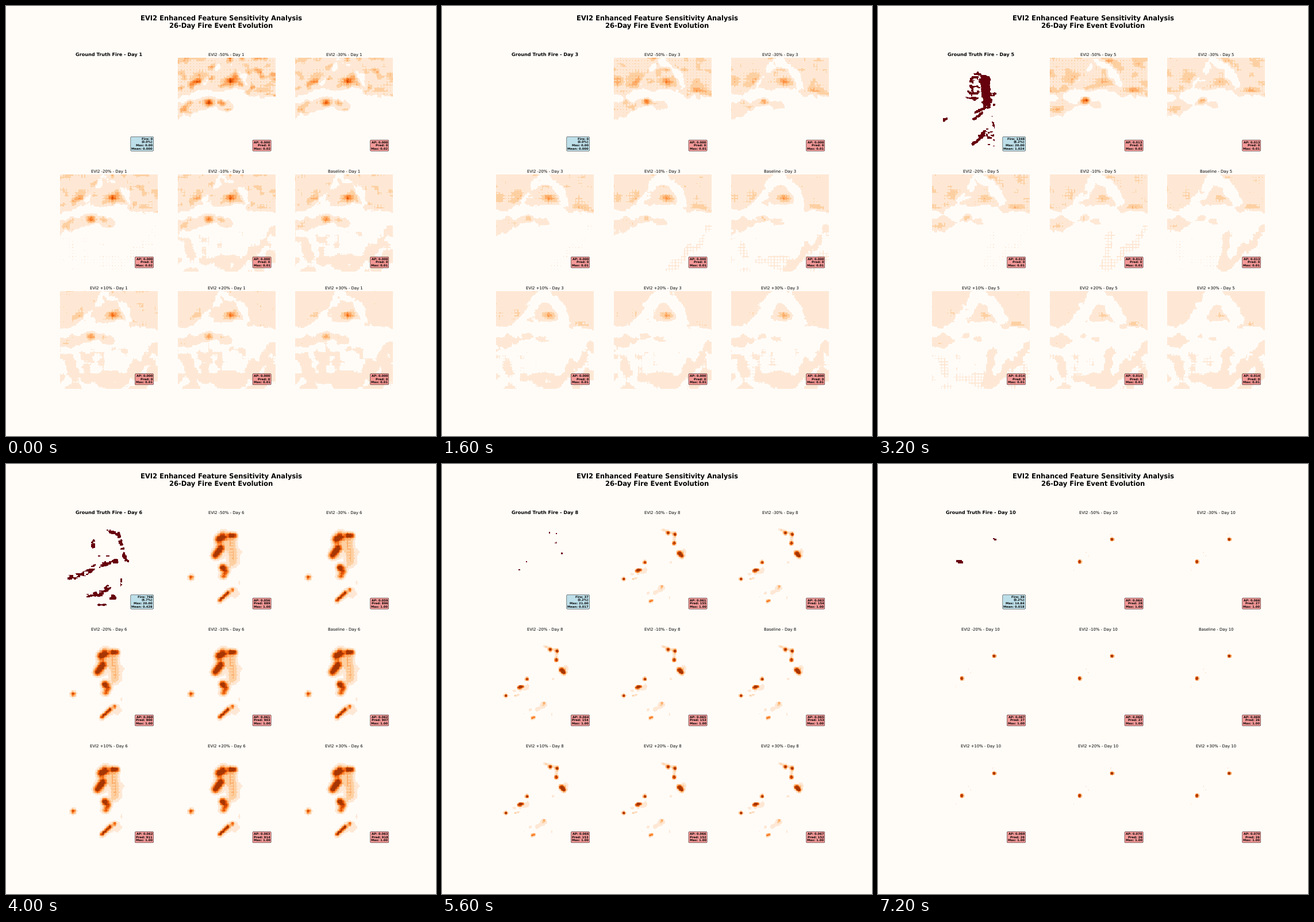
A matplotlib script that plays this animation: 748 px wide and 748 px high, repeating every 8 s.

```python
import numpy as np
import matplotlib.pyplot as plt
from matplotlib.animation import FuncAnimation
from matplotlib.colors import BoundaryNorm, ListedColormap

plt.rcParams["text.hinting"] = "none"

N = 128            # cells per side
SIDE = 170         # layout units per side
DAYS = 10
S = 11 / 18        # type scale
SHIFTS = [-50, -30, -20, -10, 0, 10, 20, 30]

axis = (np.arange(N) + 0.5) * SIDE / N
X, Y = np.meshgrid(axis, axis)
I, J = np.meshgrid(np.arange(N), np.arange(N))
# Fine lattice left behind by upsampling
TEX = ((np.cos(np.pi * I / 2) + np.cos(np.pi * J / 2)) / 2
       + (np.cos(np.pi * I) + np.cos(np.pi * J)) / 4)


def kernel(s):
    k = np.exp(-(axis[:, None] - axis[None, :]) ** 2 / (2 * s * s))
    return k / k.sum(axis=1, keepdims=True)


def blur(a, sx, sy=None):
    return kernel(sy or sx) @ a @ kernel(sx).T


def noise(seed, sx, sy=None):
    a = blur(np.random.default_rng(seed).normal(size=(N, N)), sx, sy)
    return (a - a.mean()) / a.std()


def dist(*points):
    """Distance from every cell to a point or polyline."""
    out = np.full((N, N), np.inf)
    for (ax, ay), (bx, by) in zip(points, points[1:] or points):
        dx, dy = bx - ax, by - ay
        t = ((X - ax) * dx + (Y - ay) * dy) / max(dx * dx + dy * dy, 1e-9)
        t = np.clip(t, 0, 1)
        out = np.minimum(out, np.hypot(X - ax - t * dx, Y - ay - t * dy))
    return out


def glow(size, amp, *points):
    return amp * np.exp(-(dist(*points) / size) ** 2 / 2)


def peak(x, y, sx, sy):
    return np.exp(-((X - x) / sx) ** 2 / 2 - ((Y - y) / sy) ** 2 / 2)


# Terrain shared by the days before the fire
COAST = np.interp(X, [0, 20, 38, 50, 75, 110, 125, 150, 170],
                  [58, 64, 50, 48, 54, 54, 62, 66, 63])
RIVER = np.minimum(dist((74, 6), (68, 20), (48, 42), (40, 66)),
                   dist((78, 8), (98, 16), (114, 34), (122, 52)))
WEST = 10 - dist((0, 92), (20, 88))
RIBBON = dist((30, 88), (55, 80), (84, 85))
SOUTHEAST = np.maximum(dist((166, 94), (150, 116), (125, 142), (100, 164)) - 9,
                       5 - dist((143, 106), (140, 118)))
COLUMN = dist((104, 108), (100, 135), (94, 162)) - 8
ROUGH = 2.2 * noise(3, 5) + 0.9 * noise(4, 1.5)


def land(day):
    """Low-risk maps before the fire, one per shift."""
    rough = ROUGH + 1.6 * noise(day + 10, 4)
    patches = 0.6 + 0.35 * noise(21, 6) + 0.1 * noise(day + 20, 3)
    relief = np.maximum(noise(day + 30, 5, 3.5) - 0.3, 0) * (0.055 if day == 1 else 0.025)
    wet = 0.65 + 0.35 / day
    shore = np.maximum(-SOUTHEAST, -COLUMN if day > 3 else -99)
    strip = np.clip(0.5 + (shore + rough) / 8, 0, 1)
    zone = np.clip((Y - 80) / 14, 0, 1) * wet
    south = np.maximum(np.clip(patches, 0, 1) * zone, strip)
    maps = []
    for e in np.array(SHIFTS) / 100:
        north = np.minimum(COAST - Y - 8 * e,
                           RIVER - min(9, 1 + 3 * day) * (1 + 1.1 * e))
        islands = np.maximum(WEST, max(3, 10 - 2 * day) - RIBBON) - 3 * e
        n = np.clip(0.5 + (np.maximum(north, islands) + rough) / 9, 0, 1)
        v = 0.13 * n * (1 - 0.5 * e)
        v = np.maximum(v, south * (0.078 + 0.008 / day + 0.13 * e)) * (1 + 0.15 * TEX)
        hot = relief * n * np.exp(-2 * e)
        hot += (0.5 - 0.08 * day) * np.exp(-0.3 * e) * peak(92, 42, 7, 4)
        hot += 0.42 / day ** 0.9 * np.exp(-(0.3 + 0.7 * day) * e) * peak(
            52 + 2 * day, 80 - day, 4.5, 3.5)
        hot += 0.09 * np.exp(-e) * peak(40, 36, 10, 6)
        hot += (0.05 + 0.02 * day) * np.exp(-e) * peak(148, 57, 9, 3)
        maps.append(v + hot * (1 + 0.15 * TEX + 0.15 * noise(5, 2)))
    return maps


def burn(trails, seed):
    """Burnt cells along trails (width, density, *points), broken into short runs."""
    grain = noise(seed, 1.9, 1.1).ravel().argsort().argsort().reshape(N, N) / N ** 2
    out = np.zeros((N, N), bool)
    for width, density, *points in trails:
        reach = dist(*points) / (1.25 * width)
        out |= grain < density * (1 - reach ** 4)
    return out.astype(float)


def spread(cells, s, gain):
    return blur(cells, s) * gain


def risk(v, grain=0.1):
    v = v * (1 + grain * TEX)
    return [np.clip(v * (1 + s / 2000), 0, 1) for s in SHIFTS]


truth = {d: np.zeros((N, N)) for d in range(1, DAYS + 1)}
truth[5] = burn([
    (8, 1, (92, 40), (97, 80)), (10, .5, (79, 38), (71, 68)),
    (5, .35, (104, 58), (108, 88)), (2, .95, (75, 96), (93, 88)),
    (2.2, .95, (73, 108), (87, 97)), (1.8, .5, (104, 98), (107, 122)),
    (2.4, .9, (71, 151), (90, 136)), (2.6, .75, (83, 137), (97, 126)),
    (6, .25, (100, 130), (104, 150)), (3, 1, (21, 109), (25, 107))], 15)
truth[6] = burn([
    (3, .8, (84, 27), (101, 33), (106, 48), (110, 68), (116, 80)),
    (3, .5, (58, 46), (58, 56)), (1.3, .5, (66, 70), (90, 70)),
    (3.8, .7, (16, 108), (35, 105), (52, 98), (60, 88), (72, 86), (98, 80)),
    (1.6, .9, (106, 112), (106, 121)), (4, .75, (50, 140), (72, 136), (84, 126)),
    (4, .8, (89, 143), (94, 143)), (1.6, .9, (67, 156), (79, 156))], 16)

embers = [(94, 31), (106, 33), (105, 49), (115, 67), (54, 82), (42, 96)]
last = [(52, 81), (108, 42)]

day6 = (spread(truth[5], 4, .32)
        + glow(4.5, 1.1, (72, 42), (78, 38)) + glow(3, .8, (91, 35), (99, 35))
        + glow(4.2, 1, (65, 70), (75, 57)) + glow(4, 1.1, (78, 91))
        + glow(3.5, .55, (84, 98), (80, 106)) + glow(2.2, .75, (73, 148), (87, 135))
        + glow(2.2, .6, (95, 130)) + glow(3, .6, (23, 108)))
day8 = (sum(glow(2, 1.1, p) for p in embers)
        + glow(2.6, 1, (113, 66), (118, 71)) + glow(3.5, .2, (121, 64))
        + glow(1.7, .8, (39, 97), (46, 95)) + glow(1.8, .2, (85, 25), (106, 33), (104, 50))
        + glow(1.8, 1.1, (17, 111)) + glow(1.3, .2, (33, 111), (40, 109))
        + glow(1.8, .35, (84, 124)) + glow(1.7, .65, (63, 150), (66, 149))
        + spread(truth[6], 2, .2) * np.clip(noise(8, 4) - .2, 0, 1) * (Y > 70))
day10 = (sum(glow(1.9, 1.5, p) for p in last)
         + sum(glow(1, .12, p) for p in [(63, 65), (106, 33), (42, 96), (67, 71)]))

truth[7] = (day8 > .55).astype(float)
truth[8] = (sum(peak(x - 1, y - .8, 1.9, 1.1) for x, y in embers) > .6).astype(float)
truth[9] = (day10 > .5).astype(float)
truth[10] = ((peak(47, 80.5, 4, 2.2) + peak(51, 82, 2.5, 1.4) > .5)
             | (dist((108, 41.5), (110, 43)) < 1.5)).astype(float)

pred = {d: land(d) for d in range(1, 6)}
pred.update({6: risk(day6, .15), 7: risk(spread(truth[6], 2.2, 1.6)),
             8: risk(day8, .03), 9: risk(spread(truth[8], 1.8, 1.8)),
             10: risk(day10, 0)})

# day: fire cells, share, max, mean
FIRE = {5: (1348, 8.2, 20.00, 1.024), 6: (766, 4.7, 20.00, .428),
        7: (187, 1.1, 20.00, .098), 8: (37, .2, 21.00, .017),
        9: (32, .2, 17.50, .016), 10: (39, .2, 14.84, .018)}
CELLS = {6: 907, 7: 570, 8: 153, 9: 29, 10: 26.4}
WARM = {1: 3, 4: 1, 5: 1}     # how many leading shifts peak at 0.02


def truth_note(day):
    fire, share, top, mean = FIRE.get(day, (0, 0, 0, 0))
    return f"Fire: {fire}\n({share:.1f}%)\nMax: {top:.2f}\nMean: {mean:.3f}"


def precision(day, e):
    if day < 6:
        return (13.4 + 1.5 * e) / 1000 if day == 5 else 0
    ease = 1 / (day - 5) ** 2
    return (61.8 + 1.7 * (day - 6) + (5.9 + 1.1 * ease) * e
            - (4.5 + 3.5 * ease) * e * e) / 1000


def pred_note(day, k):
    e = SHIFTS[k] / 100
    cells = CELLS.get(day, 0) * (1 + (0.25 - 0.035 * day) * e)
    top = 1 if day > 5 else 0.02 if k < WARM.get(day, 0) else 0.01
    return f"AP: {precision(day, e):.3f}\nPred: {cells:.0f}\nMax: {top:.2f}"


HEAT = ListedColormap(["none", "#fee8d5", "#fdd0a2", "#fdae6b", "#fd8d3c",
                       "#f16913", "#d94801", "#a63603"])
STEPS = BoundaryNorm([-9, .065, .19, .31, .44, .56, .69, .81, 9], 8)
BURNT = ListedColormap(["none", "#67000d"])

fig, axes = plt.subplots(3, 3, figsize=(11, 11), dpi=68, facecolor="#fffcf8")
fig.subplots_adjust(left=.125, right=.9, top=.88, bottom=.11, wspace=.2, hspace=.2)
fig.suptitle("EVI2 Enhanced Feature Sensitivity Analysis\n26-Day Fire Event Evolution",
             fontsize=20 * S, fontweight="bold", y=.98)

images, titles, notes = [], [], []
for n, ax in enumerate(axes.flat):
    ax.axis("off")
    style = dict(cmap=HEAT, norm=STEPS) if n else dict(cmap=BURNT, vmin=0, vmax=1)
    images.append(ax.imshow(np.zeros((N, N)), interpolation="nearest", **style))
    titles.append(ax.set_title("", fontsize=(12 if n else 14) * S, pad=6 * S,
                               fontweight="normal" if n else "bold"))
    notes.append(ax.text(.95, .05, "", transform=ax.transAxes, ha="right", va="bottom",
                         fontsize=9 * S, fontweight="bold",
                         bbox=dict(boxstyle="round,pad=0.3", alpha=.8, linewidth=S,
                                   facecolor="lightcoral" if n else "lightblue")))


def draw(frame):
    day = frame + 1
    images[0].set_data(truth[day])
    titles[0].set_text(f"Ground Truth Fire - Day {day}")
    notes[0].set_text(truth_note(day))
    for k, shift in enumerate(SHIFTS):
        name = f"EVI2 {shift:+d}%" if shift else "Baseline"
        images[k + 1].set_data(pred[day][k])
        titles[k + 1].set_text(f"{name} - Day {day}")
        notes[k + 1].set_text(pred_note(day, k))
    return images + titles + notes


anim = FuncAnimation(fig, draw, frames=DAYS, interval=800, repeat=True, blit=False)
plt.show()
```
